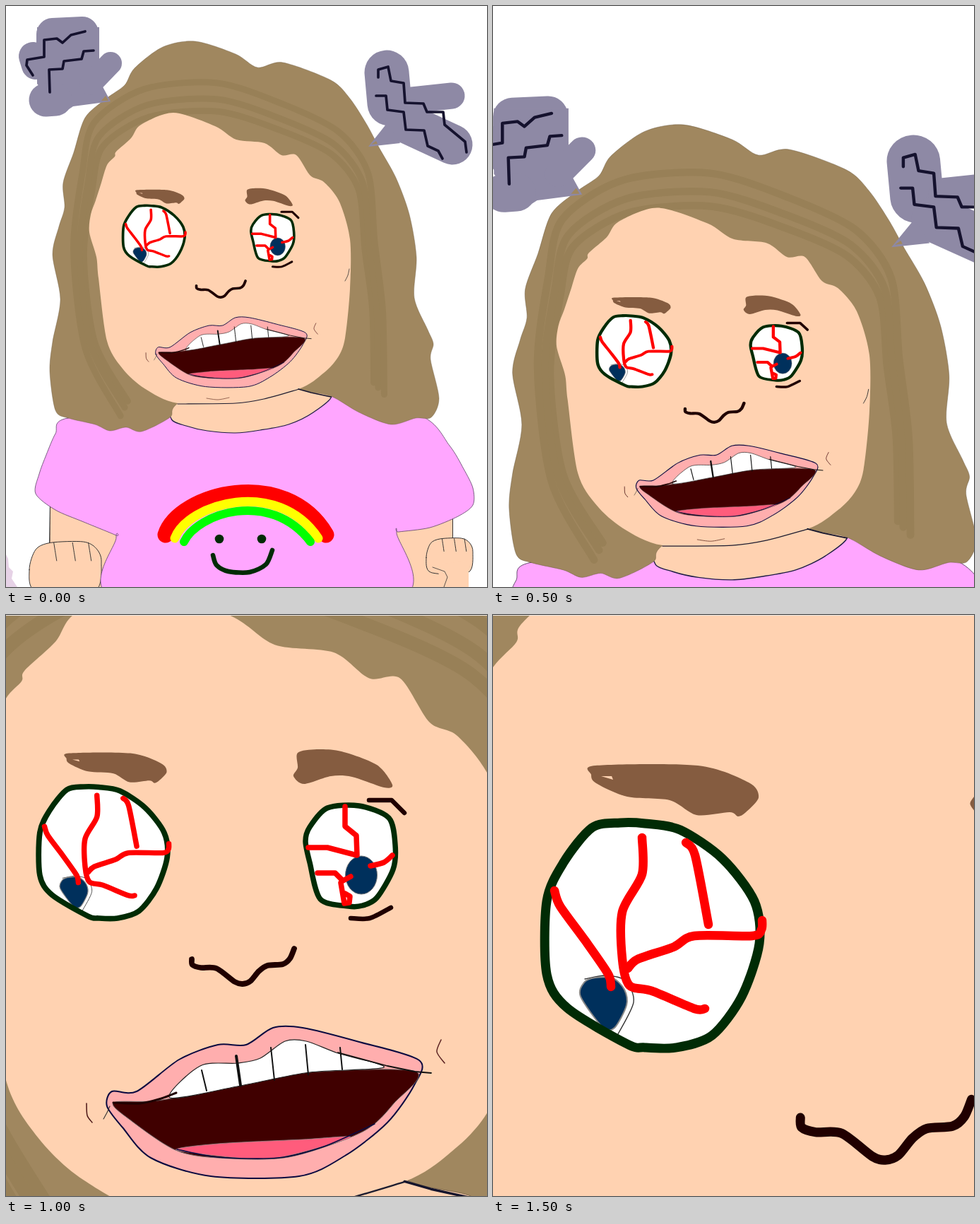
Animation of 681 by 822 pixels, one loop 2 s. Source, as an HTML page:

```html
<!DOCTYPE html>
<html lang="en">
<head>
<meta charset="utf-8">
<title>Zooming in on an angry face</title>
<style>
html, body { margin: 0; width: 100%; height: 100%; overflow: hidden; background: #fff; }
svg { display: block; width: 681px; height: 822px; }
</style>
</head>
<body>
<svg viewBox="0 0 681 822" width="681" height="822">
  <g id="world">
    <g id="body"></g>
    <g transform="scale(.479616 .4649) translate(299 364.4)">
      <g id="features"></g>
      <g id="eye" transform="scale(.598802 .584795) translate(4 121.5)"></g>
    </g>
  </g>
  <rect id="edge" width="681" height="1" fill="#ece6e0"/>
</svg>
<script>
const $ = id => document.getElementById(id);
const SKIN = '#ffd2b1', HAIR = '#a0875f', STRAND = '#988057', SHIRT = '#ffa6ff',
  CLOUD = '#8e89a5', INK = '#15122e', LIP = '#ffaeae', GREEN = '#002b05',
  BROW = '#855c40', RED = '#ff0000', PUPIL = '#00305c', NAVY = '#0a0a40',
  DARK = '#200000', THIN = '#333';

let layer;

function path(d, fill, stroke, width) {
  const el = document.createElementNS('http://www.w3.org/2000/svg', 'path');
  const attrs = { d, fill, stroke, 'stroke-width': width, 'stroke-linecap': 'round', 'stroke-linejoin': 'round' };
  for (const key in attrs) el.setAttribute(key, attrs[key]);
  layer.append(el);
}

// Smooth curve through the key points
function curve(text, closed) {
  const p = text.split(' ').map(s => s.split(',').map(Number)), n = p.length;
  const at = i => closed ? p[(i + n) % n] : p[Math.max(0, Math.min(n - 1, i))];
  let d = 'M' + p[0];
  for (let i = 0; i < (closed ? n : n - 1); i++) {
    const [a, b, c, e] = [at(i - 1), at(i), at(i + 1), at(i + 2)];
    const c1 = b.map((v, k) => v + (c[k] - a[k]) / 7);
    const c2 = c.map((v, k) => v - (e[k] - b[k]) / 7);
    d += `C${c1} ${c2} ${c}`;
  }
  return closed ? d + 'Z' : d;
}

const blob = (pts, fill, color = 'none', width = 1) => path(curve(pts, true), fill, color, width);
const stroke = (pts, color, width) => path(curve(pts), 'none', color, width);
const zigzag = (pts, color, width) => path('M' + pts, 'none', color, width);
const poly = (pts, fill) => path(`M${pts}Z`, fill, 'none', 0);
const oval = (x, y, rx, ry, fill, color = 'none') =>
  path(`M${x - rx},${y}a${rx},${ry} 0 1 0 ${2 * rx},0a${rx},${ry} 0 1 0 ${-2 * rx},0Z`, fill, color, 1);

// Three knuckle lines hang from the top of each fist
function fist(x, y, w, h) {
  const at = (u, v) => [x + u * w, y + v * h].join();
  blob([at(0, .62), at(.09, .17), at(.3, .02), at(.75, 0), at(.93, .15), at(1, .45), at(.9, 1.1), at(.1, 1.1)].join(' '), SKIN, THIN, 1);
  for (const u of [.34, .6, .82]) stroke([at(u, .02), at(u + .02, .22), at(u + .04, .42)].join(' '), THIN, 1);
}

function drawClothes() {
  zigzag('63,700 62,760', THIN, 2);
  zigzag('632,700 632,755', THIN, 2);
  poly('63,700 62,822 632,822 632,700', SKIN);
  fist(33, 758, 102, 64);
  poly('604,785 655,785 652,822 620,822 622,800', SKIN);
  fist(595, 753, 66, 44);
  poly('606,790 655,785 655,822 622,822', SKIN);
  zigzag('604,794 621,800 625,808 620,822', THIN, .8);
  poly('0,776 3,782 4,794 10,800 8,810 16,822 0,822', '#e6d2e6');

  blob('87,583 70,605 57,635 47,662 42,690 70,713 110,730 156,749 156,752 160,840 552,840 553,745 556,744 600,738 640,722 661,706 661,682 648,655 628,622 588,580 460,548 232,570', SHIRT, '#5b4565', .8);
  blob('243,555 234,584 255,594 285,601 325,604 360,600 400,592 435,575 461,550 415,535', SKIN, '#1d1d45', 1.2);
}

function drawRainbow() {
  [[RED, 23], ['#ffff00', 13], ['#00ff00', 12]].forEach(([color, width], i) => {
    const left = 226 + 13 * i, right = 453 - 11 * i, foot = 748 + 5 * i;
    path(`M${left},${foot}C${left + 19},${690 + 14 * i} ${right - 58},${650 + 16.5 * i} ${right},${foot}`, 'none', color, width);
  });
  for (const x of [302, 362]) oval(x, 754, 6.3, 6.3, GREEN);
  stroke('293,777 298,791 315,800 345,801 368,790 377,770', GREEN, 6.5);
}

function drawHair() {
  blob('88,583 70,572 62,517 66,475 77,415 66,352 75,312 83,285 81,250 96,207 112,158 142,131 168,112 182,88 222,58 268,50 325,68 356,87 392,80 460,105 487,131 511,168 528,200 552,243 571,295 581,355 578,413 597,458 605,478 601,500 613,555 602,582 580,583 545,592 500,575 460,552 415,541 330,500 243,562 232,582 192,602 170,596 147,601 126,592', HAIR, '#6b5a40', .4);

  // Strands are scaled copies of one arch
  const arch = '168,568 120,480 104,350 116,250 132,184 200,140 300,132 390,160 465,196 505,250 514,340 525,430 527,540';
  for (const s of [.94, 1, 1.08]) {
    const scaled = arch.split(' ').map(p => {
      const [x, y] = p.split(',');
      return [315 + (x - 315) * (.5 + s / 2), 420 + (y - 420) * s].join();
    });
    stroke(scaled.join(' '), STRAND, 9);
  }
}

function drawHead() {
  blob('131,385 128,355 118,320 120,295 127,275 135,250 143,225 154,213 156,206 177,187 191,168 237,151 296,170 326,189 366,194 390,211 411,211 431,240 450,249 472,277 487,330 487,400 480,470 470,497 450,519 414,542 330,561 243,562 196,541 165,513 143,474', SKIN);
  stroke('243,563 325,562 365,556 415,542', '#1d1d30', 1.1);
  zigzag('414,542 432,547 460,553', '#14142c', 1.6);
  stroke('284,555 300,557 316,554', '#7a4a3a', .8);
  stroke('486,372 484,381 480,389', THIN, .8);
}

// Clouds are built from thick round strokes
function drawClouds() {
  zigzag('66,40 108,38 109,98 66,98Z', CLOUD, 46);
  poly('44,30 132,30 132,105 148,135 95,142 80,152 44,110', CLOUD);
  zigzag('38,71 42,84', CLOUD, 40);
  zigzag('56,133 70,132', CLOUD, 47);
  zigzag('148,81 120,110', CLOUD, 32);
  poly('135,134 141,127 145,134', HAIR);
  zigzag('38,98 29,84 30,76 54,72 54,48 72,46 80,52 92,41 112,36', INK, 3.7);
  zigzag('62,122 61,90 80,89 82,78 107,75 110,64 124,63', INK, 3.7);

  zigzag('539,94 543,138', CLOUD, 63);
  zigzag('631,127 575,133', CLOUD, 37);
  zigzag('632,196 565,165', CLOUD, 57);
  poly('513,199 540,165 558,194', CLOUD);
  poly('517,196 524,191 526,195', HAIR);
  zigzag('527,101 527,90 541,86 545,106 563,109 565,137 591,138 596,150 619,150 621,168 650,192 652,207', INK, 3.7);
  zigzag('524,127 538,127 540,147 563,150 566,175 592,176 597,198 612,205 618,216', INK, 3.7);
}

function drawFarEye() {
  blob('407,228 413,216 413,195 440,190 475,193 525,212 547,240 535,244 490,229 460,228 422,239', BROW);
  blob('424,320 430,300 455,273 500,270 542,287 551,325 548,360 525,400 505,411 485,412 445,402 430,350', '#fff', GREEN, 7.5);
  oval(503, 368, 22.5, 27, PUPIL, '#777');
  zigzag('480,271 480,299 496,312 497,340 455,329 428,329', RED, 7.5);
  zigzag('441,365 466,365 477,376 488,370', RED, 7.5);
  zigzag('474,379 479,408 486,407 487,398 480,394', RED, 7.5);
  stroke('516,355 535,350 547,340', RED, 7.5);
  zigzag('514,262 546,262 564,280', DARK, 6.5);
  stroke('488,429 515,429 545,414', DARK, 6.5);
}

function drawMouth() {
  blob('143,695 150,674 185,674 245,629 300,608 340,608 378,584 420,584 500,604 585,630 578,665 540,718 480,765 415,794 290,794 205,768 165,725', LIP, NAVY, 2);
  blob('152,690 215,687 332,666 430,647 580,646 550,690 505,731 400,767 300,768 240,757 178,716', '#400000', '#666', 1);
  blob('241,757 300,748 420,742 488,739 395,766 340,769', '#ff5c7c', '#888', .8);
  blob('232,683 275,638 328,634 360,627 395,603 425,603 470,620 535,640 430,647 332,666', '#fff', '#222', 1.2);
  for (let i = 0; i < 5; i++) {
    const x = 277 + 49 * i;
    stroke(`${x},${608 + 4 * (i - 3) ** 2} ${x + 7 - i},${673 - 7.5 * i}`, '#111', i === 1 ? 4 : 2);
  }
  stroke('152,690 190,691 220,684 241,676', DARK, 3);
  zigzag('470,619 540,638 579,646 602,648', '#111', 1.8);
  stroke('242,756 300,767 385,768 450,752 522,720', NAVY, 1.6);
  stroke('114,691 115,708 122,718', '#4a1515', 1.5);
  stroke('138,713 143,704 147,695', THIN, 1.1);
  stroke('616,601 610,618 621,634', '#5a2020', 1.5);
}

function drawNose() {
  stroke('263,487 264,495 276,499 298,500 324,519 335,522 346,518 358,504 370,496 392,494 402,486 408,472', DARK, 7.8);
}

function drawNearEye() {
  const rim = '76,405 100,350 140,301 180,294 215,295 265,304 325,345 370,405 377,465 352,540 310,595 260,612 215,612 190,607 105,556 76,508';
  blob('139,226 145,213 290,213 362,237 376,258 358,279 347,285 335,279 288,283 250,262 190,257 146,238', BROW);
  poly('153,228 168,228 170,233', SKIN);
  blob(rim, '#fff');
  stroke('130,515 160,510 188,518 199,548 177,593', THIN, 1.4);
  blob('124,540 129,520 145,513 170,514 186,530 189,552 172,584 155,583', PUPIL, '#888', 2);
  blob(rim, 'none', GREEN, 13);
  stroke('87,390 95,412 130,460 163,508 167,526', RED, 12.5);
  stroke('211,315 211,367 183,420 183,487 193,524 225,532 285,557 300,557', RED, 12.5);
  stroke('191,500 205,487 255,470 285,454 367,454 380,445 381,432', RED, 12.5);
  stroke('273,322 286,340 305,438', RED, 12.5);
}

const scene = {
  body: [drawClothes, drawRainbow, drawHair, drawHead, drawClouds],
  features: [drawFarEye, drawNose, drawMouth],
  eye: [drawNearEye]
};
for (const id in scene) {
  layer = $(id);
  scene[id].forEach(draw => draw());
}

// Camera cuts: x scale, y scale, x shift, y shift
const shots = [
  [1, 1, 0, 0],
  [1.2, 1.162, -51.5, 110],
  [2.085, 2.151, -299, -364.4],
  [3.482, 3.678, -503.3, -744.6]
];
const HOLD = 500;

function render(time) {
  const i = Math.floor(time / HOLD) % shots.length;
  const [sx, sy, x, y] = shots[i];
  $('world').setAttribute('transform', `matrix(${sx} 0 0 ${sy} ${x} ${y})`);
  $('edge').setAttribute('visibility', i > 1 ? 'visible' : 'hidden');
}

const start = performance.now();
function tick() {
  render(performance.now() - start);
  requestAnimationFrame(tick);
}
tick();
</script>
</body>
</html>
```
